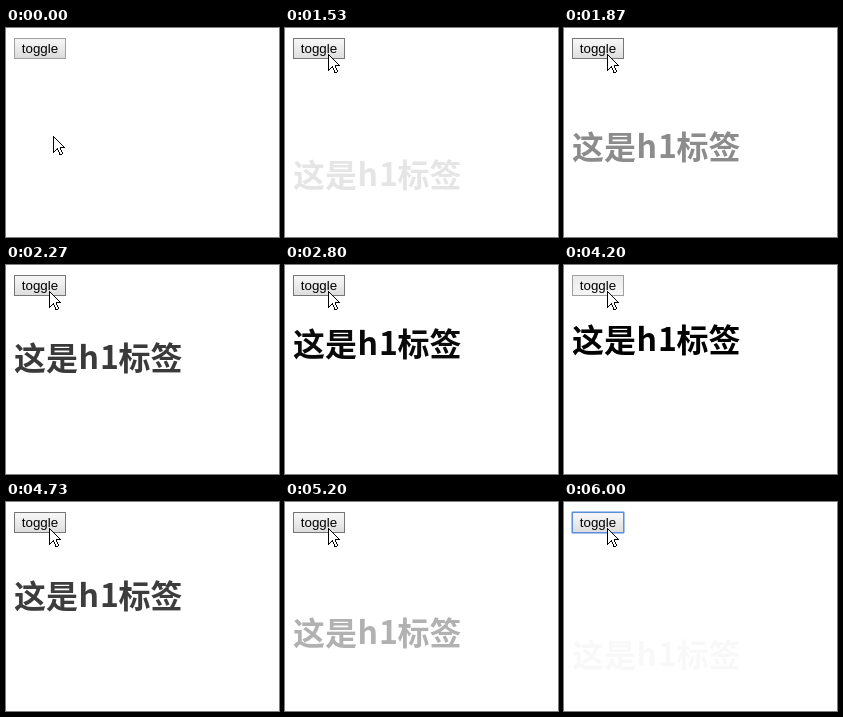
Write an HTML page that moves like this. It is 273 by 209 pixels and loops after 6.14 s.

```html
<!DOCTYPE html>
<html lang="zh">
<head>
<meta charset="utf-8">
<title>toggle</title>
<style>
  html, body { margin: 0; width: 100%; height: 100%; overflow: hidden; background: #fff; }
  svg { display: block; }
  .label { font: 13.333px "Liberation Sans", Arial, sans-serif; }
  .title { font: bold 32px "Noto Sans CJK SC", "Noto Sans CJK", "Noto Sans CJK JP", sans-serif; }
</style>
</head>
<body>
<svg width="273" height="209" viewBox="0 0 273 209">
  <defs>
    <linearGradient id="face" x1="0" y1="0" x2="0" y2="1">
      <stop id="top" offset="0.15"/>
      <stop id="bottom" offset="1"/>
    </linearGradient>
  </defs>
  <rect id="ring" x="7.5" y="9.5" width="53" height="22" rx="1.5" fill="none" stroke="#a6c4ee"/>
  <rect id="button" x="8.5" y="10.5" width="51" height="20" fill="url(#face)"/>
  <text class="label" x="15.8" y="25">toggle</text>
  <text id="title" class="title"><tspan x="8" y="87">这是</tspan><tspan x="72.5" y="86" letter-spacing="1">h1</tspan><tspan x="112.5" y="87">标签</tspan></text>
  <path id="cursor" d="M.5 .5V16.5L4.5 12.5L7 18.5H8.5L9.5 17.5L7.5 12.5V11.5H11.5Z"
    fill="#fff" stroke="#000" shape-rendering="crispEdges"/>
</svg>
<script>
const LOOP = 6140, TICK = 200 / 3;
const FADE = 2000, DROP = 80, ENTER = 1330, LEAVE = 4380;
const PRESSES = [[1130, 1265], [4195, 4330]];
const FOCUS_AT = 5995;

// time, x, y
const PATH = [
  [133, 47, 108], [333, 62, 111], [467, 63, 92], [667, 50, 42], [800, 43, 26]
];

// top, bottom, border
const LOOKS = {
  idle:  ["#f4f4f4", "#dadada", "#a0a0a0"],
  hover: ["#f5f5f5", "#dddddd", "#767676"],
  down:  ["#ececec", "#f6f6f6", "#a0a0a0"],
  focus: ["#f5f5f5", "#dddddd", "#5b8fd8"]
};

const el = id => document.getElementById(id);
const [ring, button, title, cursor, topStop, bottomStop] =
  ["ring", "button", "title", "cursor", "top", "bottom"].map(el);
const clamp = v => Math.min(1, Math.max(0, v));
const mix = (a, b, p) => a + (b - a) * p;

// cubic-bezier(.25, .1, .25, 1)
function ease(x) {
  if (x <= 0 || x >= 1) return clamp(x);
  const curve = (a, b, s) => 3 * a * s * (1 - s) ** 2 + 3 * b * s * s * (1 - s) + s ** 3;
  let lo = 0, hi = 1;
  for (let i = 0; i < 24; i++) {
    const mid = (lo + hi) / 2;
    if (curve(.25, .25, mid) < x) lo = mid; else hi = mid;
  }
  return curve(.1, 1, lo);
}

function pointer(t) {
  const i = PATH.findIndex(p => p[0] > t);
  if (i === 0) return PATH[0].slice(1);
  if (i < 0) return PATH[PATH.length - 1].slice(1);
  const a = PATH[i - 1], b = PATH[i], p = (t - a[0]) / (b[0] - a[0]);
  return [mix(a[1], b[1], p), mix(a[2], b[2], p)].map(Math.round);
}

function buttonState(t, x, y) {
  if (t >= FOCUS_AT) return "focus";
  if (PRESSES.some(([from, to]) => t >= from && t < to)) return "down";
  return x >= 8 && x < 60 && y >= 10 && y < 31 ? "hover" : "idle";
}

function draw(time) {
  const t = Math.floor((time + 4) / TICK) * TICK;

  const [x, y] = pointer(t);
  cursor.setAttribute("transform", `translate(${x} ${y})`);

  const state = buttonState(time, x, y);
  const [light, dark, border] = LOOKS[state];
  topStop.setAttribute("stop-color", light);
  bottomStop.setAttribute("stop-color", dark);
  button.setAttribute("stroke", border);
  ring.setAttribute("visibility", state === "focus" ? "visible" : "hidden");

  const shown = t < LEAVE ? ease((t - ENTER) / FADE) : 1 - ease((t - LEAVE) / FADE);
  title.setAttribute("opacity", shown);
  title.setAttribute("transform", `translate(0 ${DROP * (1 - shown)})`);
}

const start = performance.now();
function frame() {
  draw((performance.now() - start) % LOOP);
  requestAnimationFrame(frame);
}
frame();
</script>
</body>
</html>
```
